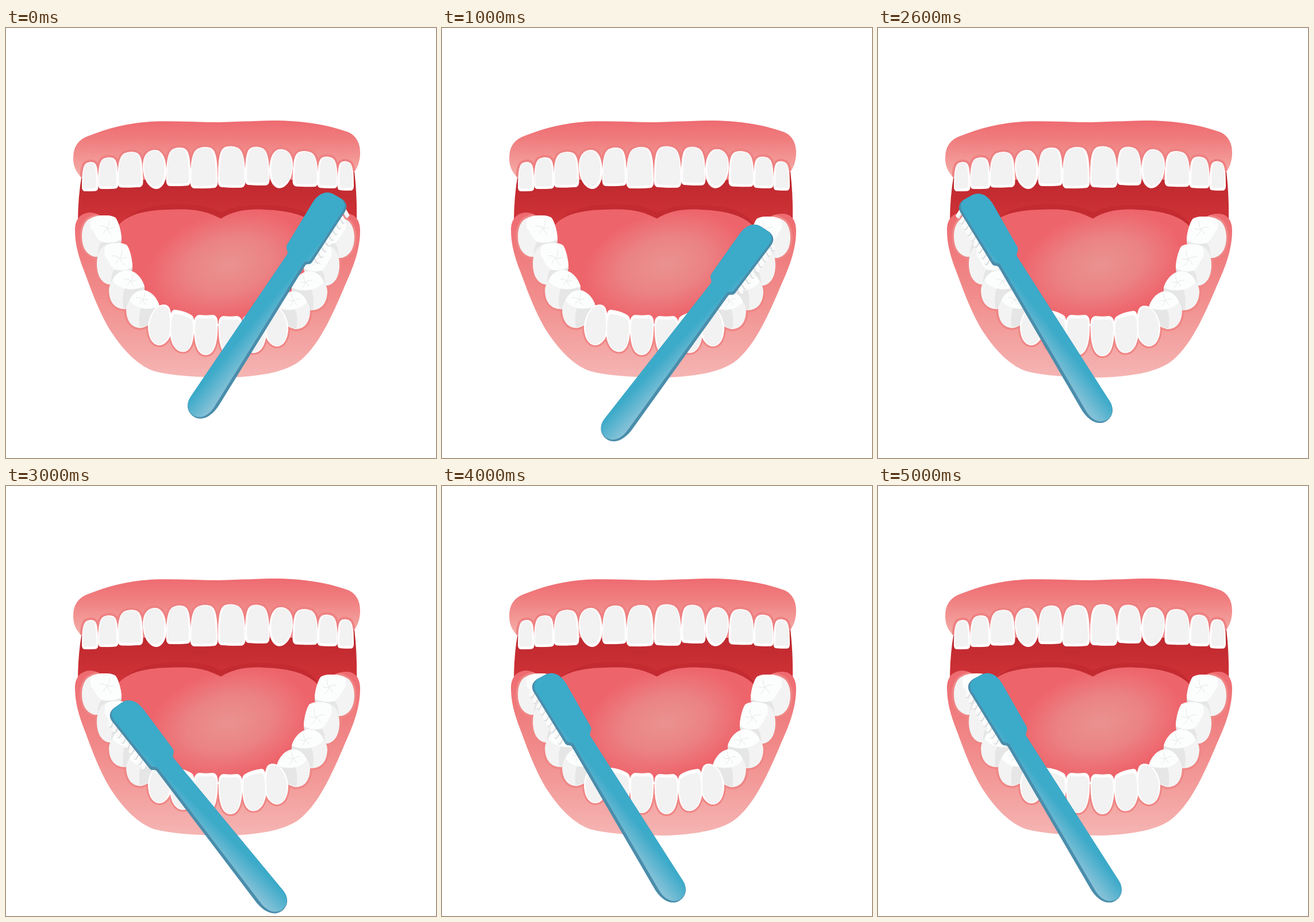
Write an HTML page that moves like this. It is 748 px wide and 748 px high and loops after 5.2 s.

```html
<!DOCTYPE html>
<html lang="en">
<head>
<meta charset="utf-8">
<title>Brushing teeth</title>
<style>
html, body { margin: 0; width: 100%; height: 100%; overflow: hidden; background: #fff; }
svg { display: block; width: 100vw; height: 100vh; }
</style>
</head>
<body>
<svg viewBox="0 0 748 748">
  <defs>
    <linearGradient id="lipFill" gradientUnits="userSpaceOnUse" x1="0" y1="163" x2="0" y2="262">
      <stop offset="0" stop-color="#ee6c71"/><stop offset=".35" stop-color="#f07f80"/><stop offset="1" stop-color="#f5b0ab"/>
    </linearGradient>
    <linearGradient id="gumFill" gradientUnits="userSpaceOnUse" x1="0" y1="325" x2="0" y2="608">
      <stop offset="0" stop-color="#ee6b70"/><stop offset=".5" stop-color="#f18d8c"/><stop offset="1" stop-color="#f5b5b3"/>
    </linearGradient>
    <linearGradient id="throatFill" gradientUnits="userSpaceOnUse" x1="0" y1="258" x2="0" y2="340">
      <stop offset="0" stop-color="#bd282e"/><stop offset="1" stop-color="#d03338"/>
    </linearGradient>
    <radialGradient id="tongueFill" gradientUnits="userSpaceOnUse" cx="0" cy="0" r="1"
      gradientTransform="translate(388 412) rotate(-14) scale(145 92)">
      <stop offset="0" stop-color="#ea9290"/><stop offset=".5" stop-color="#eb8384"/><stop offset="1" stop-color="#ee646b"/>
    </radialGradient>
    <linearGradient id="handleFill" gradientUnits="userSpaceOnUse" x1="-22" y1="-2.6" x2="24" y2="2.9">
      <stop offset="0" stop-color="#3caac9"/><stop offset="1" stop-color="#92c6da"/>
    </linearGradient>
    <path id="lip" d="M133 262C121 250 117 240 117 226C117 208 124 197 138 190C170 177 205 166 250 163C290 161 330 164 370 164C410 163 440 161 475 161C520 162 560 169 592 180C608 185 616 199 616 217C616 231 612 243 605 251L604 264H133Z"/>
    <path id="gum" d="M120 352C120 332 130 322 146 321C156 321 165 326 172 334C178 400 215 470 285 508Q368 528 453 510C525 470 560 400 566 332C574 326 582 323 592 323C608 323 616 335 616 353C616 383 606 412 590 447C572 490 548 545 519 572C495 597 450 605 390 608Q300 608 258 597C226 586 200 555 180 524C160 490 148 455 136 423C126 398 120 375 120 352Z"/>
    <clipPath id="lipClip"><use href="#lip"/></clipPath>
    <clipPath id="gumClip"><use href="#gum"/></clipPath>
    <g id="upperTeeth"></g>
    <g id="upperEdges"></g>
    <g id="lowerTeeth"></g>
    <g id="lowerEdges"></g>
  </defs>

  <path fill="url(#throatFill)" d="M133 250Q125 290 125 340L150 380H590L610 340Q611 290 606 250Z"/>
  <path fill="#c32b31" d="M195 345C225 308 270 306 310 307C345 308 360 313 374 321C395 309 440 305 480 310C515 314 535 326 548 350Z"/>
  <path fill="url(#tongueFill)" d="M188 355C205 320 250 316 300 315.500C340 315 356 323 374 331.500C395 318 420 314 450 316C500 318 530 328 548 352L550 400L460 515H280L200 430Z"/>

  <use href="#gum" fill="url(#gumFill)"/>
  <g clip-path="url(#gumClip)">
    <use href="#lowerEdges"/><use href="#lowerEdges" transform="matrix(-1 0 0 1 738 2)"/>
  </g>
  <use href="#lowerTeeth"/><use href="#lowerTeeth" transform="matrix(-1 0 0 1 738 2)"/>

  <use href="#lip" fill="url(#lipFill)"/>
  <g clip-path="url(#lipClip)">
    <use href="#upperEdges"/><use href="#upperEdges" transform="matrix(-1 0 0 1 737 -1.3)"/>
  </g>
  <use href="#upperTeeth"/><use href="#upperTeeth" transform="matrix(-1 0 0 1 737 -1.3)"/>

  <g id="brush">
    <g id="bristles" stroke-linecap="round"></g>
    <path fill="#4a8dab" d="M-23.500 -3L-15 -303C-17 -309 -23 -308 -24 -316L-26 -402C-26 -420 -18 -432 -4 -433.500L14 -434.500Q29 -433 30 -419L29 -313C28 -306 22 -308 22 -302L26 -20C27 8 15 23.500 0 23.500S-24 12 -23.500 -3Z"/>
    <path fill="url(#handleFill)" d="M-23.500 -3L-15 -303C-17 -309 -23 -308 -24 -316L-26 -402C-26 -420 -18 -432 -4 -433.500L12 -434Q25 -432 26 -419L24.500 -316C23 -309 17 -310 17 -304L20.500 -12C21 10 11 21 -1 22S-24 12 -23.500 -3Z"/>
  </g>
</svg>
<script>
const byId = id => document.getElementById(id);

// Tooth outlines in a unit box.
const SHAPES = {
  incisor: 'M.3 .03Q.52 -.03 .74 .02C.92 .06 .97 .28 .99 .6L1 .84Q1 .99 .86 .99Q.5 1.01 .14 1Q0 1 0 .84L.01 .6C.03 .3 .1 .07 .3 .03Z',
  canine: 'M.52 0C.85 0 1 .25 1 .56C1 .84 .8 1 .58 1C.25 1 0 .74 0 .42C0 .14 .2 0 .52 0Z',
  lower: 'M.2 0Q.5 .02 .82 0Q1 .02 1 .2C1 .72 .86 1 .5 1C.14 1 0 .72 0 .2Q.02 .02 .2 0Z',
  slanted: 'M.2 0C.5 .02 .7 .06 .9 .13Q1 .16 1 .33C1 .78 .86 1 .55 1C.2 1 0 .75 .02 .4C.03 .2 .05 0 .2 0Z',
  lowerCanine: 'M.4 .05C.6 -.02 .85 -.01 .9 .12C1 .3 1 .55 .95 .72C.85 .9 .65 1 .47 1C.15 1 0 .78 0 .55C0 .35 .2 .12 .4 .05Z',
  molar: 'M.22 .07C.4 -.02 .75 -.02 .85 .06C.95 .2 1 .45 1 .6C.98 .72 .9 .72 .82 .78C.68 .95 .5 1 .33 1C.1 .95 0 .75 0 .5C0 .3 .08 .12 .22 .07Z',
  molarTop: 'M.25 .06C.4 -.02 .75 -.02 .85 .06C.95 .2 1 .45 1 .57C.9 .66 .65 .68 .5 .64C.35 .55 .33 .42 .22 .3Q.2 .15 .25 .06Z',
  molarDark: 'M.5 .64C.65 .68 .9 .66 1 .57C1 .74 .88 .72 .8 .8Q.6 .98 .4 .99C.4 .85 .42 .7 .5 .64Z',
  premolar: 'M.1 .27C.2 .05 .4 0 .55 0C.8 .05 .95 .25 1 .45C1 .72 .82 .9 .45 1C.15 1 0 .8 0 .5Q.02 .35 .1 .27Z',
  premolarTop: 'M.1 .27C.2 .05 .4 0 .55 0C.8 .05 .95 .25 1 .42C.8 .5 .6 .5 .45 .47Q.2 .42 .1 .27Z',
  premolarDark: 'M.45 .47C.6 .5 .8 .5 1 .42C1.02 .68 .85 .88 .41 .99C.38 .8 .38 .6 .45 .47Z'
};

const draw = (shape, [x0, y0, x1, y1], attrs) =>
  `<path d="${SHAPES[shape]}" transform="translate(${x0} ${y0}) scale(${x1 - x0} ${y1 - y0})" ${attrs}/>`;
const fill = (shape, box, color) => draw(shape, box, `fill="${color}"`);
const outlined = (shape, box, color, width) =>
  draw(shape, box, `fill="${color}" stroke="${color}" stroke-width="${width}" vector-effect="non-scaling-stroke"`);
const inset = ([x0, y0, x1, y1], [l, t, r, b]) => [x0 + l, y0 + t, x1 - r, y1 - b];

const frontTooth = (shape, box, rim) =>
  outlined(shape, box, '#fff', 1) + fill(shape, inset(box, rim), '#f2f2f2');

function fissures(x, y, size) {
  const rays = [-75, -5, 55, 125, 195].map((deg, i) => {
    const a = deg * Math.PI / 180, r = size * (i % 2 ? .8 : 1);
    return `M${x} ${y}q${r * Math.cos(a + .4) / 2} ${r * Math.sin(a + .4) / 2} ${r * Math.cos(a)} ${r * Math.sin(a)}`;
  });
  return `<path d="${rays.join('')}" fill="none" stroke="#e6e9e8"/>`;
}

const backTooth = (shape, box, star) =>
  fill(shape, box, '#f3f3f3') + fill(shape + 'Dark', box, '#e6e6e6') +
  fill(shape + 'Top', box, '#fcfdfd') + fissures(...star);

const upper = [
  ['incisor', [132.5, 233.5, 160, 283.5]],
  ['incisor', [160.5, 225.5, 195, 279.5]],
  ['incisor', [194.5, 216, 238, 277]],
  ['canine', [238.5, 212.5, 278.5, 279.5]],
  ['incisor', [279, 208.5, 321, 274.5]],
  ['incisor', [321, 207.5, 368, 278.5]]
];
const back = [
  ['molar', [132, 326, 201, 398], [176, 348, 14]],
  ['molar', [158, 374, 220, 446], [198, 400, 15]],
  ['premolar', [179, 421, 241, 489], [217, 440, 12]],
  ['premolar', [209, 456, 267, 522], [238, 472, 12]]
];
const front = [
  ['lowerCanine', [247.5, 481, 289, 551.5], [2, 2, 3, 1]],
  ['slanted', [284.5, 490.5, 327, 563], [2, 7, 2, 1]],
  ['lower', [327, 499.5, 368, 568.5], [2, 5, 2, 1]]
];

byId('upperEdges').innerHTML = upper.map(([s, b]) => outlined(s, b, '#ee8182', 9)).join('');
byId('upperTeeth').innerHTML = upper.map(([s, b]) => frontTooth(s, b, [1.5, 1, 3, 4])).join('');
byId('lowerEdges').innerHTML = [...back, ...front].map(([s, b]) => outlined(s, b, '#ef8685', 7)).join('');
byId('lowerTeeth').innerHTML =
  back.map(t => backTooth(...t)).join('') + front.map(t => frontTooth(...t)).join('');

const tuft = (y, color, width) =>
  `<path d="M27 ${y - 4}L37 ${y + 1}" stroke="${color}" stroke-width="${width}"/>`;
byId('bristles').innerHTML = Array.from({ length: 9 }, (_, i) => {
  const y = -417 + i * 11.8;
  return tuft(y + 2.5, '#dcdfe0', 6) + tuft(y, '#fafafa', 6);
}).join('');

// Each pose: handle end x, y, tilt in degrees.
const POSES = {
  right: { A: [339.5, 656.5, 32.5], B: [300, 696, 36.5], C: [272.5, 720.5, 39] },
  left: { A: [384.5, 664, -31], B: [400.5, 701.5, -31], C: [465.5, 720.5, -38] }
};
const STEP = 200;
const STROKES = { right: 'ABCBABCBABCBA', left: 'ABCBABCBABCAB' };
const sequence = Object.entries(STROKES).flatMap(([side, keys]) =>
  [...keys].map(key => {
    const [x, y, tilt] = POSES[side][key];
    return `translate(${x} ${y}) rotate(${tilt}) scale(${side === 'left' ? -1 : 1} 1)`;
  }));

const brush = byId('brush');
let start;
function render(now) {
  start ??= now;
  const step = Math.floor((now - start) / STEP) % sequence.length;
  brush.setAttribute('transform', sequence[step]);
  requestAnimationFrame(render);
}
brush.setAttribute('transform', sequence[0]);
requestAnimationFrame(render);
</script>
</body>
</html>
```
